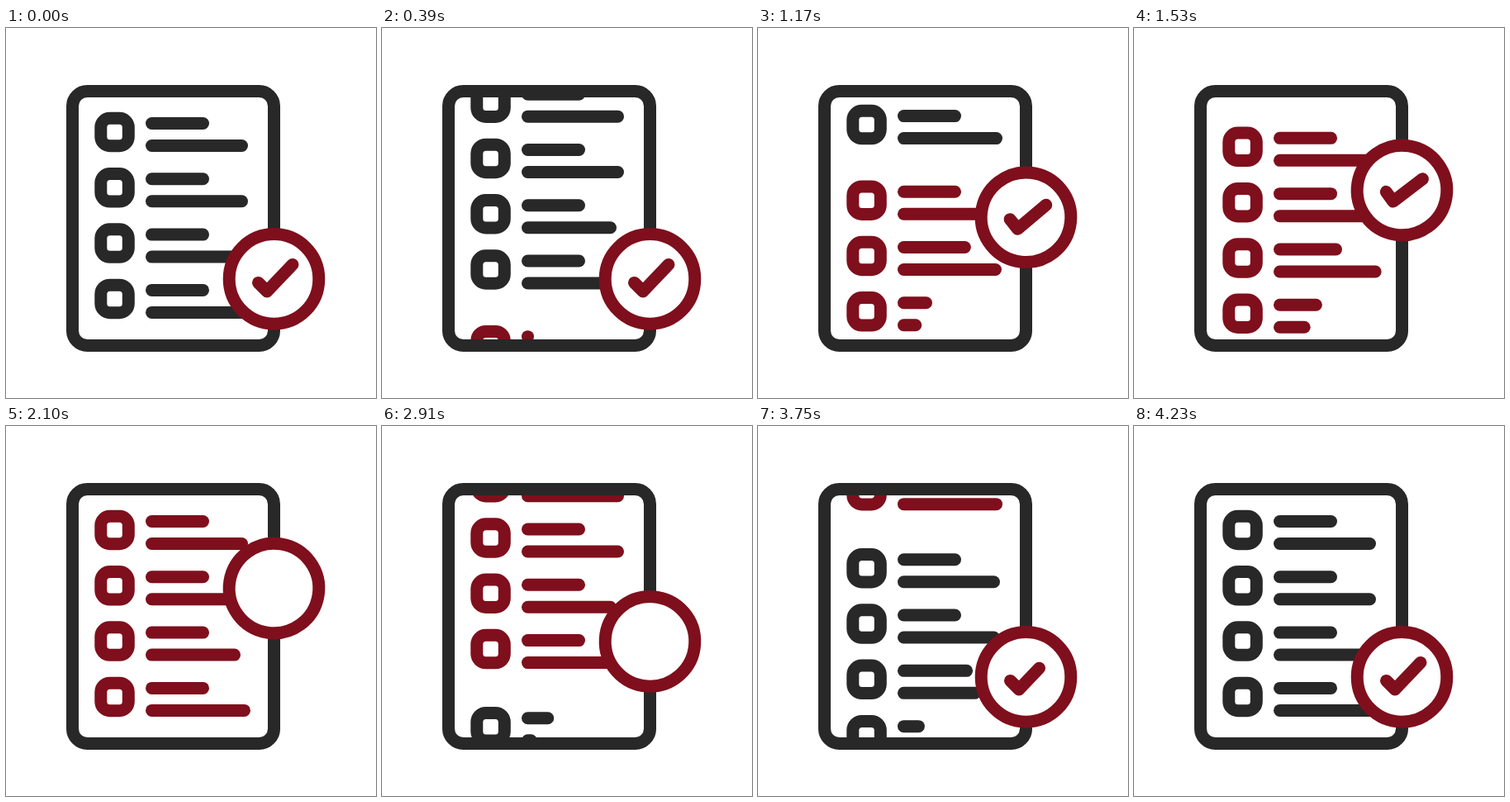
An HTML page for the animation above (4.83 s loop, 448 by 448 pixels).

```html
<!DOCTYPE html>
<html lang="en">
<head>
<meta charset="utf-8">
<title>Checklist</title>
<style>
  html, body { margin: 0; width: 100%; height: 100%; overflow: hidden; background: #fff; }
  svg { display: block; width: 100vw; height: 100vh; }
  svg * { fill: none; stroke-width: 15; stroke-linecap: round; stroke-linejoin: round; }
  .dark { stroke: #282828; }
  .red { stroke: #7f0f1c; }
  #badge circle { fill: #fff; }
</style>
</head>
<body>
<svg viewBox="0 0 448 448">
  <clipPath id="page"><rect x="84" y="84" width="237" height="293.5"/></clipPath>
  <g clip-path="url(#page)">
    <g id="darkList" class="dark"></g>
    <g id="redList" class="red"></g>
  </g>
  <rect class="dark" x="80.5" y="76.5" width="244" height="308" rx="18"/>
  <g id="badge" class="red">
    <circle r="54.3"/>
    <path id="tick" pathLength="1" d="M-19 4.5L-8.5 15L22.5 -17.5"/>
  </g>
</svg>
<script>
const LOOP = 4830, STEP = 30, TURN = 2400;
const ROW_GAP = 67.3, LEFT = 176.5, OVERSHOOT = 16;
const SHORT = 62, LONG = [109, 109, 100, 112];
const GROW = 480, SETTLE = 120;

// Start times of the two lines in each row, counted from the start of a scroll
const SCROLLS = [
  { travel: 293.5, starts: [[390, 500], [650, 790], [980, 1065], [1270, 1380]] },
  { travel: 296, starts: [[332, 460], [620, 740], [915, 1030], [1201, 1315]] }
];

const byId = id => document.getElementById(id);
const badge = byId('badge'), tick = byId('tick');

function ease(t, start, length) {
  const s = Math.min(1, Math.max(0, (t - start) / length));
  return s * s * (3 - 2 * s);
}

function add(parent, tag, attrs) {
  const el = document.createElementNS('http://www.w3.org/2000/svg', tag);
  for (const key in attrs) el.setAttribute(key, attrs[key]);
  return parent.appendChild(el);
}

function makeList(group) {
  const rows = LONG.map((long, i) => {
    const y = 126 + i * ROW_GAP;
    add(group, 'rect', { x: 114.8, y: y - 16.75, width: 33.5, height: 33.5, rx: 11 });
    return [[y - 10.5, SHORT], [y + 16.5, long]].map(([lineY, size]) =>
      ({ el: add(group, 'path', {}), y: lineY, size }));
  });
  return { group, rows };
}

const lists = [makeList(byId('darkList')), makeList(byId('redList'))];

function lineLength(size, age) {
  return (size + OVERSHOOT) * ease(age, 0, GROW) - OVERSHOOT * ease(age, GROW, SETTLE);
}

function drawList(list, offset, ageOf) {
  list.group.setAttribute('transform', `translate(0 ${offset})`);
  list.rows.forEach((row, i) => row.forEach((line, j) => {
    const age = ageOf(i, j);
    line.el.setAttribute('d', age < 0 ? '' : `M${LEFT} ${line.y}h${lineLength(line.size, age)}`);
  }));
}

function drawTick(from, to) {
  tick.style.display = to > from ? '' : 'none';
  tick.setAttribute('stroke-dasharray', `${to - from} 2`);
  tick.setAttribute('stroke-dashoffset', -from);
}

function draw(t) {
  const turn = t < TURN ? 0 : 1;
  const local = t - turn * TURN;
  const { travel, starts } = SCROLLS[turn];
  const scroll = travel * ease(local, 0, 1800);
  drawList(lists[turn], -scroll, () => Infinity);
  drawList(lists[1 - turn], travel - scroll, (i, j) => local - starts[i][j]);

  const lift = ease(t, 600, 900) - ease(t, TURN, 900);
  badge.setAttribute('transform', `translate(324.5 ${303.9 - 107.4 * lift}) rotate(${9 * lift})`);
  if (turn) drawTick(0, ease(t, 3300, 600));
  else drawTick(ease(t, 1500, 600), 1);
}

const begin = performance.now();
function frame() {
  const t = (performance.now() - begin) % LOOP;
  draw(Math.floor(t / STEP) * STEP);
  requestAnimationFrame(frame);
}
frame();
</script>
</body>
</html>
```
